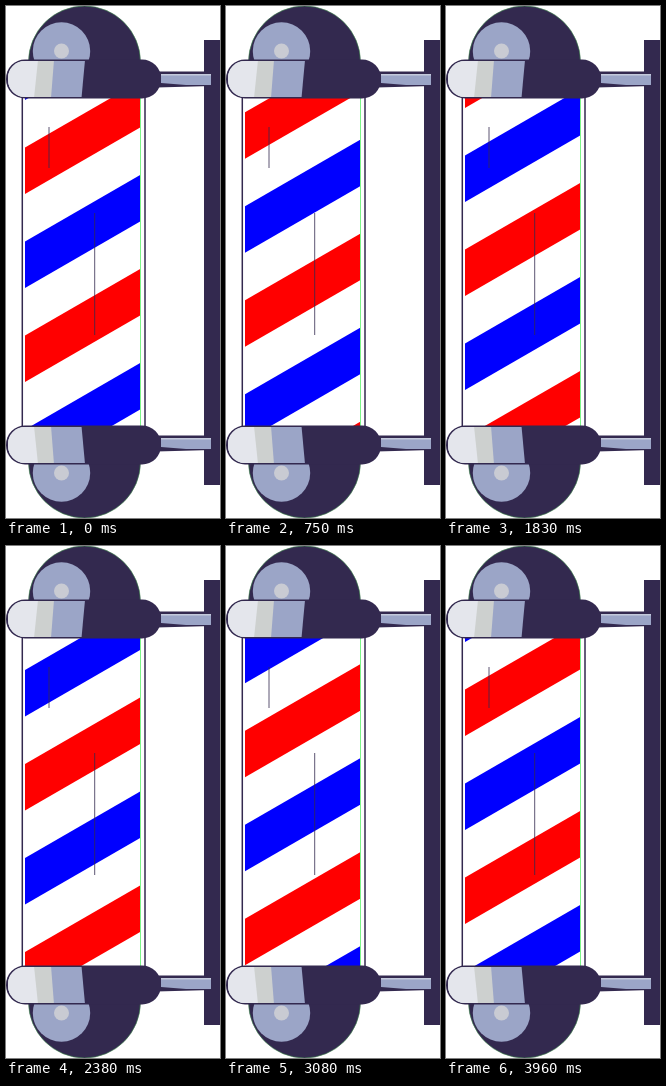
An HTML page that plays this animation: 214 by 512 pixels, repeating every 4000 ms.

```html
<!DOCTYPE html>
<html lang="en">
<head>
<meta charset="utf-8">
<title>Barber pole</title>
<style>
  html, body { margin: 0; width: 100%; height: 100%; overflow: hidden; background: #fff; }
  svg { display: block; }
</style>
</head>
<body>
<svg width="214" height="512" viewBox="0 0 214 512">
  <defs>
    <clipPath id="glass"><rect x="19" y="92" width="116" height="328"/></clipPath>
    <clipPath id="upper"><rect width="214" height="54"/></clipPath>
    <clipPath id="shine"><rect x="2" y="55" width="100" height="36" rx="17"/></clipPath>
    <g id="cap">
      <g clip-path="url(#upper)">
        <circle cx="78.5" cy="56" r="56" fill="#33294f" stroke="#3f8a4c" stroke-width=".6"/>
        <circle cx="55.5" cy="45" r="28.7" fill="#9ba5c7"/>
        <circle cx="55.5" cy="45" r="7.5" fill="#c9cbd3"/>
      </g>
      <rect y="53.5" width="155" height="39" rx="19" fill="#33294f"/>
      <g clip-path="url(#shine)">
        <path d="M0 54H79L75.5 92H0Z" fill="#9ba5c7"/>
        <path d="M0 54H48L45 92H0Z" fill="#cdd0cf"/>
        <path d="M0 54H32L28 92H0Z" fill="#e4e6ec"/>
      </g>
    </g>
    <g id="arm">
      <path d="M150 65.5H206V80L150 81.5Z" fill="#33294f"/>
      <path d="M155 68H205V79H180L155 77Z" fill="#9ba5c7"/>
      <path d="M155 68H205V69.5H155Z" fill="#c3c9db"/>
    </g>
  </defs>

  <rect x="198" y="34" width="16" height="445" fill="#33294f"/>
  <use href="#arm"/>
  <use href="#arm" y="364"/>

  <g clip-path="url(#glass)"><g id="stripes"></g></g>
  <path d="M134.5 92V420" stroke="#7df58a"/>
  <path d="M16.3 92V420M139 92V420" stroke="#33294f" stroke-width="1.5"/>
  <path d="M43 121V162M88.7 207V329" stroke="#33294f" stroke-width=".8"/>

  <use href="#cap"/>
  <use href="#cap" transform="matrix(1 0 0 -1 0 512)"/>
</svg>
<script>
  const LOOP = 4000, STEPS = 96, GAP = 94;
  const stripes = document.getElementById('stripes');

  for (let k = -1; k < 7; k++) {
    const band = document.createElementNS('http://www.w3.org/2000/svg', 'path');
    band.setAttribute('d', `M19 ${141.6 + k * GAP}l116 -67v46.5l-116 67z`);
    band.setAttribute('fill', k % 2 ? '#00f' : '#f00');
    stripes.append(band);
  }

  // 24 steps per second, each starting on the nearest 10 ms
  function draw() {
    const t = performance.now() % LOOP;
    const step = Math.floor((t + 4.99) * STEPS / LOOP) % STEPS;
    stripes.setAttribute('transform', `translate(0 ${-2 * GAP * step / STEPS})`);
    requestAnimationFrame(draw);
  }
  draw();
</script>
</body>
</html>
```
